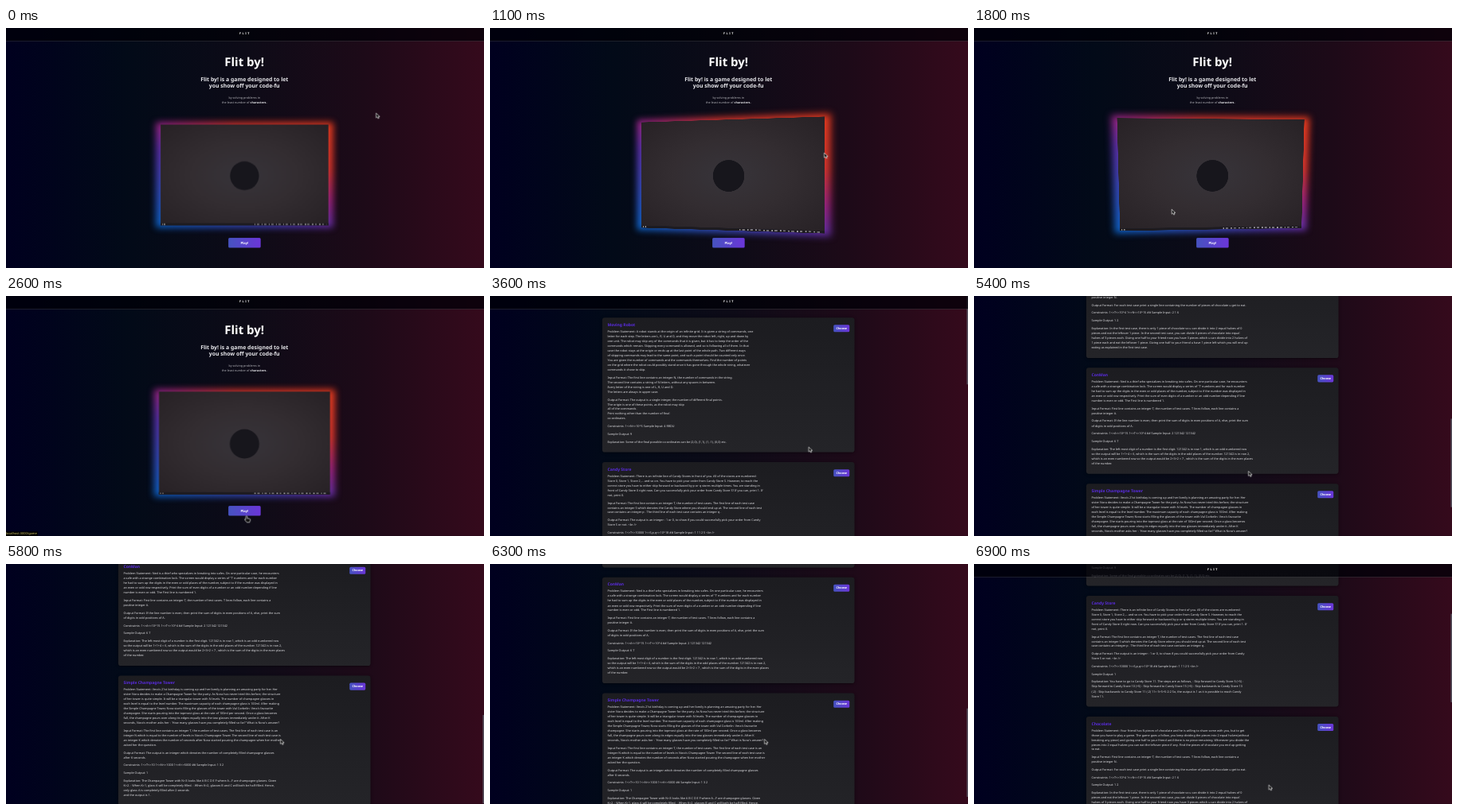
Animation of 600 by 302 pixels, one loop 7000 ms. Source, as an HTML page:

```html
<!DOCTYPE html>
<html lang="en">
<head>
<meta charset="utf-8">
<title>Flit by!</title>
<style>
  html, body { margin: 0; width: 100%; height: 100%; overflow: hidden; background: #05050f; }
  /* Laid out at 1920 wide, shown at 600 wide. */
  #stage {
    position: absolute; width: 1920px; height: 966.4px; overflow: hidden;
    transform: scale(.3125); transform-origin: 0 0;
    background: linear-gradient(90deg, #00001f 0, #020a18 25%, #0d0b17 50%, #1d0a18 75%, #350a1c 100%);
    color: #fff; font-family: "Noto Sans", "Open Sans", sans-serif;
    text-rendering: geometricPrecision;
  }
  #stage div, #stage svg { position: absolute; }
  #header {
    left: 0; top: 0; width: 100%; height: 51px; border-bottom: 2px solid #ffffff38;
    background: #000008b8; text-align: center; font: 700 12px/46px "Noto Sans", sans-serif;
    letter-spacing: 5px;
  }
  #landing, #list { left: 0; top: 0; width: 100%; }
  #landing { height: 100%; text-align: center; }
  #landing .line { left: 0; width: 1915px; white-space: pre; }
  .title { top: 99px; font: 700 48px/72px "Noto Sans", sans-serif; }
  .lead { top: 191px; font: 600 22px/28px "Noto Sans", sans-serif; color: #e8e8ec; }
  .hint { top: 272px; font-size: 12px; line-height: 19.2px; color: #b0b0b6; }
  .hint b { color: #e4e4e8; }
  #video { left: 621px; top: 389px; width: 674px; height: 406px; }
  .glow {
    inset: -9px -19px; filter: blur(13px);
    background: linear-gradient(25deg, #0a63c4, #5a30a8 42%, #9c2480 57%, #d8352c 74%, #e83c1e);
  }
  .screen { inset: 0; background: radial-gradient(#37343a, #332d31 45%, #272125); }
  .mark { left: 279px; top: 148px; width: 116px; height: 116px; border-radius: 50%; background: #17161c; }
  .bar { left: 0; right: 0; bottom: 0; height: 9px; background: #1d1b20; }
  .tray { right: 8px; bottom: 2px; width: 290px; height: 5px;
    background: repeating-linear-gradient(90deg, #99959a 0 5px, #0000 5px 11px, #77737a 11px 20px, #0000 20px 29px); }
  .tabs { left: 5px; bottom: 2px; width: 14px; height: 5px;
    background: repeating-linear-gradient(90deg, #999 0 4px, #0000 4px 9px); }
  .button {
    background: linear-gradient(90deg, #4653c0, #6b36d8); border-radius: 5px;
    text-align: center; font-weight: 700;
  }
  .play { left: 893px; top: 845px; width: 130px; height: 40px; font-size: 13px; line-height: 39px; }
  #list { padding-top: 87px; }
  #list .card {
    position: relative; left: 451px; width: 1013px; box-sizing: border-box;
    margin-bottom: 39.5px; padding: 46px 0 33px 21px; border-radius: 10px;
    background: linear-gradient(#1c1c20, #242428); box-shadow: 0 2px 10px #0008;
  }
  .name { left: 21px; top: 15px; font: 600 16px/26px "Noto Sans", sans-serif; color: #5a2ce0; }
  .choose { right: 20px; top: 29px; width: 64px; height: 29px; font-size: 12px; line-height: 28px; }
  .card p { margin: 0 0 12px; font-size: 12px; line-height: 19.2px; white-space: pre; color: #dcdce0; }
  .card p:last-child { margin: 0; }
  #thumb { right: 0; top: 0; width: 5px; height: 356px; background: #55505c; }
  #status { left: 0; bottom: 0; padding: 0 3px 0 0; background: #000; color: #d0c46a; font-size: 12.6px; line-height: 18px; }
  #cursor { left: 0; top: 0; width: 0; height: 0; }
  #cursor svg { left: 0; top: 0; width: 30px; height: 32px; overflow: visible; fill: #111; stroke: #fff; stroke-width: 2; }
</style>
</head>
<body>
<div id="stage">
  <div id="landing">
    <div class="line title">Flit by!</div>
    <div class="line lead">Flit by! is a game designed to let
you show off your code-fu</div>
    <div class="line hint">by solving problems in
the least number of <b>characters.</b></div>
    <div id="video">
      <div class="glow"></div>
      <div class="screen">
        <div class="mark"></div>
        <div class="bar"></div><div class="tray"></div><div class="tabs"></div>
      </div>
    </div>
    <div class="button play">Play!</div>
  </div>
  <div id="list"></div>
  <div id="thumb"></div>
  <div id="header">FLIT</div>
  <div id="status">localhost:3000/game</div>
  <div id="cursor">
    <svg id="arrow"><path d="M0 0V19L5 15L8 22L12 20L9 14H15Z"/></svg>
    <svg id="hand"><path d="M-3 1Q0-3 3 1V9L13 11Q16 12 15 17L12 25H1L-8 14Q-7 10-3 13Z"/></svg>
  </div>
</div>
<script>
const LOOP = 7000, UNIT = 3.2;
const $ = id => document.getElementById(id);

const problems = {
  'Moving Robot': `Problem Statement: A robot stands at the origin of an infinite grid. It is given a string of commands, one
letter for each step. The letters are L, R, U and D, and they move the robot left, right, up and down by
one unit. The robot may skip any of the commands that it is given, but it has to keep the order of the
commands which remain. Skipping every command is allowed, and so is following all of them. In that
case the robot stays at the origin or ends up at the last point of the whole path. Two different ways
of skipping commands may lead to the same point, and such a point should be counted only once.
You are given the number of commands and the commands themselves. Find the number of points
on the grid where the robot could possibly stand once it has gone through the whole string, whatever
commands it chose to skip.

Input Format: The first line contains an integer N, the number of commands in the string.
The second line contains a string of N letters, without any spaces in between.
Every letter of the string is one of L, R, U and D.
The letters are always in upper case.

Output Format: The output is a single integer, the number of different final points.
The origin is one of these points, as the robot may skip
all of the commands.
Print nothing other than the number of final
co-ordinates.

Constraints: 1<=N<=10^5 Sample Input: 4 RRDU

Sample Output: 9

Explanation: Some of the final possible co-ordinates can be (2,0), (1,1), (1,-1), (0,0) etc.`,

  'Candy Store': `Problem Statement: There is an infinite line of Candy Stores in front of you. All of the stores are numbered-
Store 0, Store 1, Store 2,... and so on. You have to pick your order from Candy Store S. However, to reach the
correct store you have to either skip forward or backward by p or q stores multiple times. You are standing in
front of Candy Store 0 right now. Can you successfully pick your order from Candy Store S? If you can, print 1. If
not, print 0.

Input Format: The first line contains an integer T, the number of test cases. The first line of each test case
contains an integer S which denotes the Candy Store where you should end up at. The second line of each test
case contains an integer p . The third line of each test case contains an integer q .

Output Format: The output is an integer : 1 or 0, to show if you could successfully pick your order from Candy
Store S or not. <br />

Constraints: 1<=T<=10000 1<=S,p,q<=10^18 ## Sample Input: 1 11 2 5 <br />

Sample Output: 1

Explanation: You have to go to Candy Store 11. The steps are as follows, - Skip forward to Candy Store 5 (+5) -
Skip forward to Candy Store 10 (+5) - Skip forward to Candy Store 15 (+5) - Skip backwards to Candy Store 13
(-2) - Skip backwards to Candy Store 11 (-2) 11= 5+5+5-2-2 So, the output is 1 as it is possible to reach Candy
Store 11.`,

  'Chocolate': `Problem Statement: Your friend has N pieces of chocolate and he is willing to share some with you, but to get
those you have to play a game. The game goes a follow, you keep dividing the pieces into 2 equal halves(without
breaking any piece) and giving one half to your friend until there is no piece remaining. Whenever you divide the
pieces into 2 equal halves you can eat the leftover piece if any. Find the pieces of chocolate you end up getting
to eat.

Input Format: First line contains an integer T, the number of test cases. T lines follow, each line contains a
positive integer N.

Output Format: For each test case print a single line containing the number of pieces of chocolate u get to eat.

Constraints: 1<=T<=10^4 1<=N<=10^15 ## Sample Input: 2 1 6

Sample Output: 1 2

Explanation: In the first test case, there is only 1 piece of chocolate so u can divide it into 2 equal halves of 0
pieces and eat the leftover 1 piece. In the second test case, you can divide 6 pieces of chocolate into equal
halves of 3 pieces each. Giving one half to your friend now you have 3 pieces which u can divide into 2 halves of
1 piece each and eat the leftover 1 piece. Giving one half to your friend u have 1 piece left which you will end up
eating as explained in the first test case.`,

  'ConMan': `Problem Statement: Ned is a thief who specializes in breaking into safes. On one particular case, he encounters
a safe with a strange combination lock. The screen would display a series of 'T' numbers and for each number
he had to sum up the digits in the even or odd places of the number, subject to if the number was displayed in
an even or odd row respectively. Print the sum of even digits of a number or an odd number depending if line
number is even or odd. The First line is numbered 1.

Input Format: First line contains an integer T, the number of test cases. T lines follow, each line contains a
positive integer A.

Output Format: If the line number is even, then print the sum of digits in even positions of A, else, print the sum
of digits in odd positions of A.

Constraints: 1<=A<=10^15 1<=T<=10^4 ## Sample Input: 2 121342 121342

Sample Output: 6 7

Explanation: The left most digit of a number is the first digit. 121342 is in row 1, which is an odd numbered row
so the output will be 1+1+4 = 6, which is the sum of the digits in the odd places of the number. 121342 is in row 2,
which is an even numbered row so the output would be 2+3+2 = 7 , which is the sum of the digits in the even places
of the number.`,

  'Simple Champagne Tower': `Problem Statement: Vera's 21st birthday is coming up and her family is planning an amazing party for her. Her
sister Nora decides to make a Champagne Tower for the party. As Nora has never tried this before, the structure
of her tower is quite simple. It will be a triangular tower with N levels. The number of champagne glasses in
each level is equal to the level number. The maximum capacity of each champagne glass is 100ml. After making
the Simple Champagne Tower, Nora starts filling the glasses of the tower with Val Corbelin- Vera's favourite
champagne. She starts pouring into the topmost glass at the rate of 100ml per second. Once a glass becomes
full, the champagne pours over along its edges equally into the two glasses immediately under it. After K
seconds, Nora's mother asks her - 'How many glasses have you completely filled so far?' What is Nora's answer?

Input Format: The first line contains an integer T, the number of test cases. The first line of each test case is an
integer N which is equal to the number of levels in Nora's Champagne Tower. The second line of each test case is
an integer K which denotes the number of seconds after Nora started pouring the champagne when her mother
asked her the question.

Output Format: The output is an integer which denotes the number of completely filled champagne glasses
after K seconds.

Constraints: 1<=T<=10 1<=N<=1000 1<=K<=5000 ## Sample Input: 1 3 2

Sample Output: 1

Explanation: The Champagne Tower with N=3 looks like A B C D E F where A...F are champagne glasses. Given
K=2. - When K=1, glass A will be completely filled. - When K=2, glasses B and C will both be half-filled. Hence,
only glass A is completely filled after 2 seconds
and the output is 1.`
};

function add(parent, tag, className, text = '') {
  const el = document.createElement(tag);
  el.className = className;
  el.textContent = text;
  return parent.appendChild(el);
}

for (const [name, text] of Object.entries(problems)) {
  const card = add($('list'), 'div', 'card');
  add(card, 'div', 'name', name);
  add(card, 'div', 'button choose', 'Choose');
  text.split('\n\n').forEach(part => add(card, 'p', '', part));
}

// Each step is [time in ms, ...values]; the last one holds until the loop ends.
function play(id, steps, style, easing = 'linear') {
  const frames = [...steps, [LOOP, ...steps.at(-1).slice(1)]].map(
    ([time, ...values]) => ({ offset: time / LOOP, easing, ...style(...values) }));
  $(id).animate(frames, { duration: LOOP, iterations: Infinity }).startTime = 0;
}

const opacity = value => ({ opacity: value });
const shift = (x, y) => ({ transform: `translate(${x * UNIT}px, ${y * UNIT}px)` });
const toggle = (id, ...steps) => play(id, steps, opacity, 'step-end');

const tilt = (x, y, scale) => ({
  transform: `perspective(1000px) rotateX(${x}deg) rotateY(${y}deg) scale(${scale})`
});
play('video', [
  [0, 0, 0, 1], [500, 0, 0, 1], [650, 1, -4, 1.05], [850, 1, -7, 1.1], [1100, 0, -8, 1.1],
  [1300, 0, -1, 1.1], [1550, -1, 6, 1.1], [1800, -4, 3, 1.1], [2100, -6, 1, 1.1],
  [2300, -4, 0, 1.08], [2450, -1, 0, 1.045], [2600, 0, 0, 1.02], [2800, 0, 0, 1]
], tilt);

play('cursor', [
  [0, 464.5, 107], [200, 472, 112], [500, 432, 138], [800, 405, 160], [1100, 420, 157],
  [1300, 320, 182], [1550, 215, 195], [1800, 248, 228], [2100, 288, 256], [2400, 302, 277],
  [3200, 302, 277], [3600, 400, 190], [4000, 390, 170], [4300, 344.5, 220.5],
  [6350, 344.5, 220.5], [6700, 368, 270], [6900, 370, 278]
], shift);

toggle('hand', [0, 0], [2300, 1], [3200, 0]);
toggle('arrow', [0, 1], [2300, 0], [3200, 1]);
toggle('status', [0, 0], [2350, 1], [3300, 0]);
toggle('thumb', [0, 0], [2900, 1]);
play('landing', [[0, 1], [2750, 1], [2900, 0]], opacity);
play('list', [[0, 0], [2900, 0], [3200, 1]], opacity);

const scroll = [
  [0, 0], [4420, 0], [4500, 55], [4600, 137], [4800, 250], [5000, 325], [5200, 378], [5400, 416],
  [5600, 470], [5800, 512], [6200, 512], [6300, 490.5], [6400, 430], [6500, 350], [6600, 270],
  [6700, 205], [6800, 172], [6900, 169]
];
play('list', scroll, y => shift(0, -y));
play('thumb', scroll, y => shift(0, y * .371));
play('header', [[0, 0], [4650, 0], [4850, -17], [6320, -17], [6520, 0]], y => shift(0, y));
</script>
</body>
</html>
```
